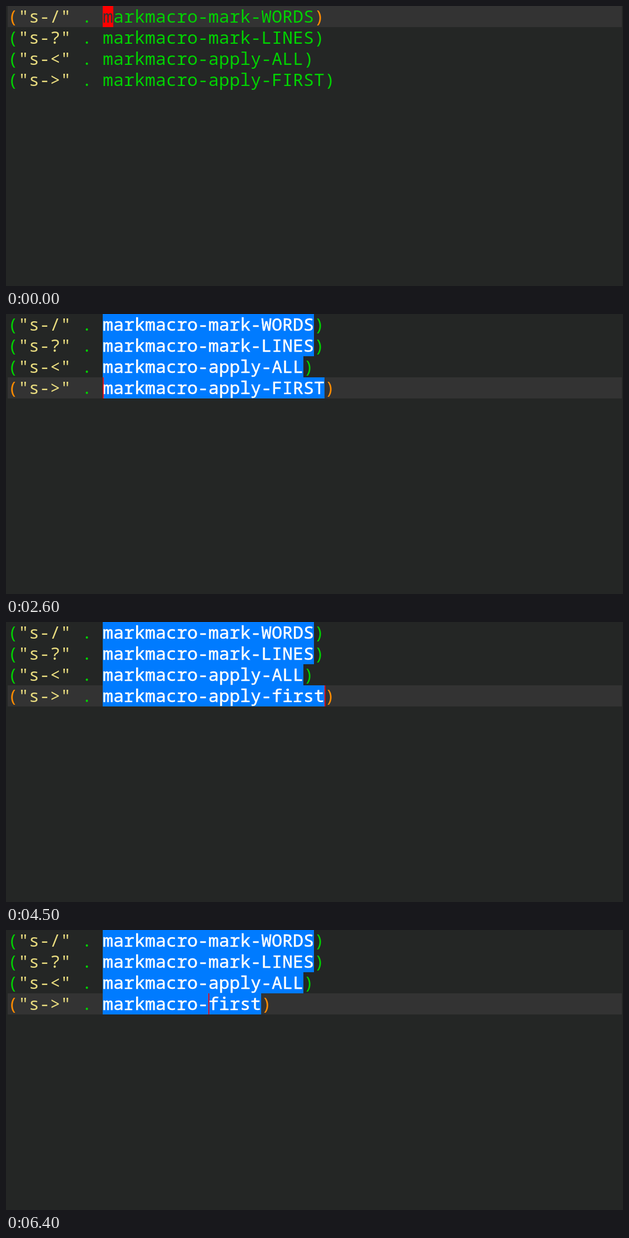
Animation, 1110 px wide and 504 px high, one loop 8 s. Source, as an HTML page:

```html
<!DOCTYPE html>
<html lang="en">
<head>
<meta charset="utf-8">
<title>Marking and editing</title>
<style>
  html, body { margin: 0; width: 100%; height: 100%; overflow: hidden; background: #242625; }
  svg { display: block; width: 1110px; height: 504px; }
  text {
    font: 31.667px "Noto Sans Mono", "DejaVu Sans Mono", monospace;
    font-variant-ligatures: none;
    white-space: pre;
  }
  .bold { stroke: currentColor; stroke-width: .55px; }
</style>
</head>
<body>
<svg id="stage" viewBox="0 0 1110 504"></svg>
<script>
const LOOP = 8000, LEFT = 3, CHAR = 19, ROW = 38, BASE = 30, NAME_COL = 9;
const GREEN = '#00d200', YELLOW = '#e9dc7f', ORANGE = '#ff8c00', PINK = '#ff6c6b',
      RED = '#ff0000', BLUE = '#007bff', WHITE = '#ffffff', LINE = '#333333', MATCH = '#1d272d';

const keys = ['/', '?', '<', '>'];
const names = ['markmacro-mark-WORDS', 'markmacro-mark-LINES', 'markmacro-apply-ALL'];

// Each step overrides only what changes at its time.
const steps = [
  { at: 0, row: 0, col: 9, block: true, marked: false, paren: 'inside', last: 'markmacro-apply-FIRST' },
  { at: 500, block: false },
  { at: 1100, row: 1 },
  { at: 1300, row: 2 },
  { at: 1500, row: 3 },
  { at: 2600, marked: true },
  { at: 3400, col: 31, paren: 'outside' },
  { at: 3600, paren: 'match' },
  { at: 4000, col: 25 },
  { at: 4100, paren: 'inside' },
  { at: 4500, col: 30, last: 'markmacro-apply-first' },
  { at: 5400, col: 25 },
  { at: 6100, col: 24, last: 'markmacro-applyfirst' },
  { at: 6400, col: 19, last: 'markmacro-first' }
];

const stage = document.getElementById('stage');
const x = col => LEFT + col * CHAR;
const escapeText = s => s.replace(/&/g, '&amp;').replace(/</g, '&lt;').replace(/>/g, '&gt;');

const box = (row, left, width, fill) =>
  `<rect x="${left}" y="${row * ROW}" width="${width}" height="${ROW}" fill="${fill}"/>`;

const text = (row, col, str, fill, bold) =>
  `<text x="${x(col)}" y="${row * ROW + BASE}" fill="${fill}"` +
  `${bold ? ` class="bold" color="${fill}"` : ''}>${escapeText(str)}</text>`;

function drawRow(row, state) {
  const current = row === state.row;
  const name = row < 3 ? names[row] : state.last;
  const end = NAME_COL + name.length;
  const match = current && state.paren === 'match';
  const paren = match ? PINK : current && state.paren === 'inside' ? ORANGE : GREEN;
  let out = '';
  if (current) out += box(row, LEFT, 1108 - LEFT, LINE);
  if (match) out += box(row, x(0), CHAR, MATCH) + box(row, x(end), CHAR, MATCH);
  if (state.marked) out += box(row, x(NAME_COL), name.length * CHAR, BLUE);
  out += text(row, 0, '(', paren, match);
  out += text(row, 1, `"s-${keys[row]}"`, YELLOW);
  out += text(row, 7, '.', GREEN);
  out += text(row, NAME_COL, name, state.marked ? WHITE : GREEN, state.marked);
  out += text(row, end, ')', paren, match);
  if (current) out += drawCursor(state, name);
  return out;
}

function drawCursor({ row, col, block }, name) {
  if (!block) return box(row, x(col), 1.7, RED);
  return box(row, x(col), CHAR, RED) + text(row, col, name[col - NAME_COL], LINE);
}

function stateAt(time) {
  return Object.assign({}, ...steps.filter(step => step.at <= time));
}

let shown = -1;
function render(time) {
  const state = stateAt(time);
  if (state.at === shown) return;
  shown = state.at;
  stage.innerHTML = keys.map((_, row) => drawRow(row, state)).join('');
}

const start = performance.now();
function tick() {
  render((performance.now() - start) % LOOP);
  requestAnimationFrame(tick);
}
tick();
</script>
</body>
</html>
```
